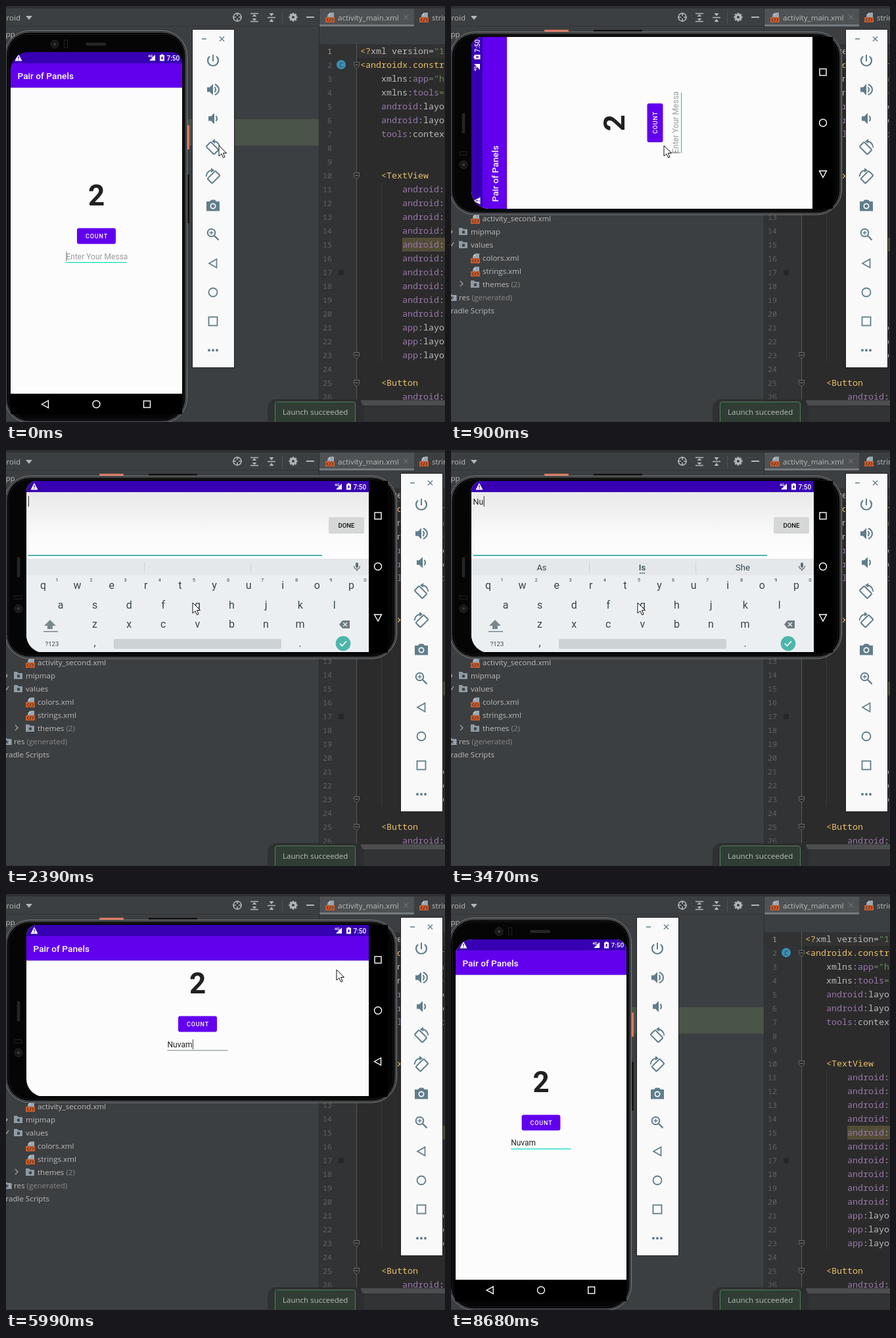
These frames come from a looping animation (668x632 px, 9080 ms). An HTML page:

```html
<!DOCTYPE html>
<html lang="en">
<head>
<meta charset="utf-8">
<title>Device rotation</title>
<style>
html, body { margin: 0; width: 100%; height: 100%; overflow: hidden; background: #3c3f41; }
svg { display: block; width: 668px; height: 632px; }
text { white-space: pre; }
.ui { font: 11.55px "Open Sans", "Noto Sans", sans-serif; fill: #bbb; }
.code { font: 13.33px "Noto Sans Mono", "DejaVu Sans Mono", monospace; }
.num { font: 11.67px "Noto Sans Mono", monospace; fill: #606366; text-anchor: end; }
.app { font-family: Roboto, sans-serif; }
.mid { text-anchor: middle; }
</style>
</head>
<body>
<svg id="stage" viewBox="0 0 668 632" xmlns="http://www.w3.org/2000/svg"></svg>
<script>
const LOOP = 9080, NAME = 'Nuvam', TITLE = 'Pair of Panels', TEAL = '#03dac5';

const rect = (x, y, w, h, fill, more = '') =>
  `<rect x="${x}" y="${y}" width="${w}" height="${h}" fill="${fill}" ${more}/>`;
const path = (d, more = '') => `<path d="${d}" ${more}/>`;
const line = (d, color, w = 1, more = '') =>
  path(d, `fill="none" stroke="${color}" stroke-width="${w}" ${more}`);
const circle = (x, y, r, more = '') => `<circle cx="${x}" cy="${y}" r="${r}" ${more}/>`;
const text = (x, y, s, more = '') => `<text x="${x}" y="${y}" ${more}>${s.replace(/</g, '&lt;')}</text>`;
const at = (x, y, body, more = '') => `<g transform="translate(${x} ${y})" ${more}>${body}</g>`;

// ---- editor window -------------------------------------------------
const fileIcon = (x, y) => at(x, y,
  path('M8-7H13V0H3V-2z', 'fill="#9aa7b0"') + path('M3-3L7-7V-3z', 'fill="#c3cbd0"') +
  rect(0, 0, 14, 8, '#c75b2c') +
  line('M4.5 1.5L2 4L4.5 6.5M9.5 1.5L12 4L9.5 6.5M8 1.5L6 6.5', '#4a2c20'));

const folder = (x, y) => at(x, y,
  path('M0-6H5L7-4H13V5H0z', 'fill="#8e9ba4"') + rect(5, -1.5, 4, 4, '#3c3f41'));

function tree() {
  const row = (x, y, s, note = '') =>
    text(x, y + 4, s, 'class="ui"').replace('</text>', `<tspan fill="#888">${note}</tspan></text>`);
  let out = rect(0, 172, 476, 40, '#4a5448') + text(-7, 47, 'app', 'class="ui" font-weight="700"');
  for (const [y, s] of [[323, 'activity_second.xml'], [383, 'colors.xml'], [403, 'strings.xml']])
    out += fileIcon(30, y) + row(48, y, s);
  out += folder(12, 343) + row(30, 343, 'mipmap') + folder(12, 363) + row(30, 363, 'values') +
    folder(30, 423) + row(48, 423, 'themes ', '(2)') + row(12, 443, 'res ', '(generated)') +
    folder(-5, 443) + line('M2 441H9M2 444H9M2 447H9', '#9aa7b0', 1.5) +
    text(66, 467, 'Gradle Scripts', 'class="ui" text-anchor="end"');
  return out + line('M14 418L18 422L14 426M-2 339L2 343L-2 347M-2 361L1 364L4 359', '#a0a2a4', 1.3);
}

function header() {
  const c = '#b4b6b8';
  let gear = '';
  for (let a = 0; a < 360; a += 45) gear += rect(-1.5, -6.5, 3, 4, c, `transform="rotate(${a})"`);
  return rect(0, 0, 668, 3, '#2e3032') + line('M0 3.5H668M0 30.5H477', '#323436') +
    text(22, 22, 'Android', 'class="ui" text-anchor="end"') + path('M30 15H40L35 21z', `fill="${c}"`) +
    line('M352 10V15M352 19V24M345 17H350M354 17H359', c, 1.6) +
    circle(352, 17, 6, `fill="none" stroke="${c}" stroke-width="1.6"`) +
    line('M372 11.5H384M372 23.5H384M398 17.5H410', c, 1.6) +
    path('M378 12.5L381.5 16H374.5zM378 22.5L381.5 19H374.5zM404 15.5L400.5 11H407.5zM404 19.5L400.5 24H407.5z', `fill="${c}"`) +
    line('M420.5 8V27', '#515355') +
    at(437, 17, gear + circle(0, 0, 3.4, `fill="none" stroke="${c}" stroke-width="2.6"`)) +
    line('M457 17H469', c, 2);
}

function editor() {
  const tag = '#e8bf6a', ns = '#9876aa', key = '#bababa', str = '#6a8759';
  const row = n => 68 + 21 * (n - 1);
  const code = (n, x, ...parts) => {
    let out = '';
    for (let i = 0; i < parts.length; i += 2) {
      out += text(x, row(n) + 5, parts[i + 1], `class="code" fill="${parts[i]}"`);
      x += parts[i + 1].length * 8;
    }
    return out;
  };
  let out = rect(477, 31, 191, 577, '#2b2b2b') + rect(477, 31, 57, 577, '#313335') +
    rect(477, 31, 191, 27, '#3c3f41') + rect(477, 58, 191, 21, '#323232') +
    rect(477, 608, 191, 24, '#313335') + line('M476.5 3V608', '#2b2d2e') +
    rect(477, 4, 144, 27, '#4e5254') + rect(477, 28, 144, 3, '#747a80') +
    fileIcon(486, 17) + text(505, 22, 'activity_main.xml', 'class="ui"') +
    line('M605 13.5L612 20.5M612 13.5L605 20.5', '#7c8082') +
    fileIcon(629, 17) + text(648, 22, 'strings.xml', 'class="ui"') +
    rect(603, 352, 65, 21, '#524d36') +
    line('M533.5 58V600', '#55585a') + line('M571.5 268V541', '#3a3a3a');
  for (let n = 1; n <= 26; n++)
    out += text(496, row(n) + 4.5, '' + n, `class="num" ${n == 1 ? 'style="fill:#a4a3a3"' : ''}`);
  for (const y of [90, 258, 531, 573])
    out += path(`M529.5 ${y - 4.5}H537.5V${y + 1}L533.5 ${y + 5}L529.5 ${y + 1}z`, 'fill="#2b2b2b" stroke="#686b6d"') +
      line(`M531.5 ${y - 0.5}H535.5`, '#86898b');
  out += circle(510, 89, 7, 'fill="#3b8fb3"') +
    text(510, 92.5, 'C', 'class="ui mid" style="font-size:9px;fill:#1f3a47"') + rect(506, 401, 8, 8, '#252627');
  out += code(1, 539, tag, '<?', key, 'xml version=', str, '"1.0"') +
    code(2, 539, tag, '<androidx.constraint') +
    code(3, 571, key, 'xmlns:', ns, 'app', str, '="http') +
    code(4, 571, key, 'xmlns:', ns, 'tools', str, '="ht') +
    code(7, 571, ns, 'tools', key, ':context') +
    code(10, 571, tag, '<TextView') + code(25, 571, tag, '<Button');
  for (const n of [5, 6]) out += code(n, 571, ns, 'android', key, ':layout');
  for (let n = 11; n <= 20; n++) out += code(n, 603, ns, 'android', key, ':id');
  for (const n of [21, 22, 23]) out += code(n, 603, ns, 'app', key, ':layout');
  return out + code(26, 603, ns, 'android', key, ':id') + rect(540, 599, 128, 8, '#4c4d4e');
}

const notice = rect(398, 597, 146, 50, '#2b2d2e', 'rx="14" opacity=".75"') +
  rect(409.5, 601.5, 122, 40, '#303d34', 'rx="3" stroke="#55805a"') +
  text(421, 621, 'Launch succeeded', 'class="ui"') + line('M0 631.5H409', '#323436');

// ---- phone ---------------------------------------------------------
const screenPath = 'M7 620V97A27 27 0 0 1 34 70H252A16 16 0 0 1 268 86V620z';

function shell() {
  let grill = '';
  for (let x = 123; x < 151; x += 3) grill += `M${x} 56L${x + 2} 60`;
  return rect(275, 256, 4, 74, '#161616') + rect(276, 181, 3, 37, '#d9795f', 'rx="1"') +
    rect(-2, 37.5, 277.5, 596, '#2c2e2f', 'rx="38" stroke="#808284"') +
    rect(0.5, 40, 272.5, 591, '#000', 'rx="35" stroke="#5a5c5e"') +
    rect(3, 43, 267.5, 585, '#050505', 'rx="32" stroke="#1d1e1f"') +
    circle(74, 58, 6, 'fill="#151515" stroke="#2c2c2c"') + circle(74, 58, 2.5, 'fill="#333"') +
    rect(88.5, 52, 5, 11, 'none', 'stroke="#222"') +
    rect(121, 55.5, 31, 5, '#1b1b1b', 'rx="2"') + line(grill, '#3a3a3a');
}

function app(id, w, h, base) {
  const cx = w / 2, left = cx - 46, wide = w > h;
  const spots = [53, 130.5, 207.5];
  const [b, o, q] = wide ? spots.map(v => [535, 260.5 - v]) : spots.map(v => [v, 535]);
  const status = rect(0, 0, w, 17, '#3700b3') +
    path('M12 3L17.5 13.5H6.5z', 'fill="#fff"') + rect(11.4, 6.5, 1.3, 3.5, '#3700b3') + rect(11.4, 11, 1.3, 1.2, '#3700b3') +
    path(`M${w - 41} 13V4L${w - 50} 13z`, 'fill="#fff"') +
    text(w - 52, 8, '4G', 'font-size="6" font-weight="700" fill="#fff"') +
    path(`M${w - 34} 4.5h2v-1h3v1h2v9h-7z`, 'fill="#fff"') + rect(w - 31.5, 7, 2, 4, '#3700b3') +
    text(w - 23.5, 12.5, '7:50', 'font-size="10" font-weight="500" fill="#fff"');
  return `<g id="${id}" class="app">` + rect(-1, -1, wide ? 552 : w + 1, wide ? h + 2 : 552, '#000') +
    rect(0, 0, w, h, '#fcfcfc') + rect(0, 17, w, 37, '#6200ee') + rect(0, 54, w, 1, '#000', 'opacity=".12"') +
    text(10.5, 41, TITLE, 'font-size="13.7" font-weight="500" fill="#fff"') +
    text(cx, base, '2', 'class="mid" font-size="44" font-weight="700" fill="#212121"') +
    rect(cx - 29.5, base + 34.5, 59, 24, '#6200ee', 'rx="3"') +
    text(cx + .5, base + 50, 'COUNT', 'class="mid" font-size="9" font-weight="500" letter-spacing=".9" fill="#fff"') +
    text(left, base + 81.5, 'Enter Your Messa', `id="${id}Text" font-size="12" fill="#9b9b9b"`) +
    rect(left, base + 86, 92, 1.2, TEAL, `id="${id}Line"`) +
    rect(left, base + 70, 1, 15, '#777', `id="${id}Caret"`) +
    status + (wide ? keyboard() : '') +
    `<g fill="none" stroke="#fff" stroke-width="1.4">` +
    at(...b, path('M-5.5 0L4.5-5.5V5.5z', `id="${id}Back"`)) + circle(...o, 5.5) +
    rect(q[0] - 5, q[1] - 5, 10, 10, 'none') + '</g></g>';
}

// Laid out in page coordinates of the turned phone, then moved into its screen.
function keyboard() {
  const key = (x, y, s, size = 16, more = '') =>
    text(x, y, s, `class="mid" font-size="${size}" fill="#37474f" ${more}`);
  let keys = '';
  [...'qwertyuiop'].forEach((k, i) => {
    const x = 56.5 + 52.1 * i;
    keys += key(x, 211, k) + key(x + 21, 200, '' + (i + 1) % 10, 7.5);
  });
  [...'asdfghjkl'].forEach((k, i) => keys += key(83 + 52.1 * i, 241, k));
  [...'zxcvbnm'].forEach((k, i) => keys += key(135 + 52.1 * i, 270, k));
  keys += key(70, 298, '?123', 9.5) + key(135, 298, ',') + key(447.5, 299, '.');
  keys += rect(164, 287, 255, 15, '#cdd2d5', 'rx="2"') +
    path('M67 258L76 267H71V272H63V267H58z', 'fill="#78868d"') + rect(57, 275, 22, 1.5, '#78868d') +
    path('M507 265L512 259H523V271H512z', 'fill="#6b7a82"') + line('M513 262L519 268M519 262L513 268', '#eceff1', 1.4) +
    circle(513, 294, 11.3, 'fill="#4db6ac"') + line('M508 294L511.5 297.5L518 290.5', '#fff', 1.6) +
    rect(532, 171, 4, 8, '#5f6e76', 'rx="2"') + line('M529.5 176Q530 181 534 181Q538 181 538.5 176M534 181V184', '#5f6e76', 1.3);
  const hints = [138, 291, 444].map((x, i) =>
    key(x, 183, '', 13, `id="hint${i}" ${i == 1 ? 'font-weight="500"' : ''}`)).join('');
  return at(-31, -47, `<g id="ime">` + rect(31, 64, 521, 101, 'url(#shade)') +
    rect(34, 159.5, 447, 1.4, '#009688') +
    rect(491, 102, 54, 25, '#d6d7d7', 'id="done" rx="2"') +
    text(518, 118, 'DONE', 'class="mid" font-size="9.5" font-weight="500" fill="#111"') +
    text(33.5, 83, '', 'id="typed" font-size="12.5" fill="#222"') + rect(34, 70, 1, 16, '#333', 'id="typedCaret"') +
    `<g id="keys">` + rect(31, 165, 521, 142, '#eceff1') + rect(31, 165, 521, 25, '#e4e8ea') +
    line('M210.5 170V187M372.5 170V187', '#cdd2d5') +
    hints + `<g id="dots">` + [288, 291, 294].map(x => circle(x, 187, .9, 'fill="#37474f"')).join('') +
    '</g>' + keys + '</g></g>');
}

// ---- emulator side bar ---------------------------------------------
function toolbar() {
  const c = '#607d8b', st = (d, w = 2) => line(d, c, w);
  const speaker = path('M-9-3.5H-5L0-8.5V8.5L-5 3.5H-9z', `fill="${c}"`);
  const turn = rect(-5, -8.5, 10, 17, 'none', `stroke="${c}" stroke-width="2" rx="1.5" transform="translate(-1 1) rotate(-45)"`) +
    st('M1-9.5Q9-9 10.5 0', 1.8) + path('M3-13V-6L-2-9.5z', `fill="${c}"`);
  const items = [
    st('M0-9V1') + st('M-5-6.5A8 8 0 1 0 5-6.5', 2.2),
    speaker + st('M2.5-4Q5.5 0 2.5 4M3-8Q9-5 9 0Q9 5 3 8'),
    at(2, 0, speaker + st('M2.5-4Q5.5 0 2.5 4')),
    turn,
    `<g transform="scale(-1 1)">${turn}</g>`,
    path('M-10-6H-5L-3-8.5H3L5-6H10V8.5H-10z', `fill="${c}"`) + circle(0, 1, 4.5, 'fill="#f9f9f9"') + circle(0, 1, 2.8, `fill="${c}"`),
    circle(-2.5, -2.5, 5.8, `fill="none" stroke="${c}" stroke-width="2"`) + st('M2 2L8.5 8.5', 2.4) + st('M-5.5-2.5H.5M-2.5-5.5V.5', 1.4),
    st('M-6 0L5.5-6.5V6.5z', 1.7),
    circle(0, 0, 6.5, `fill="none" stroke="${c}" stroke-width="1.8"`),
    rect(-6.5, -6.5, 13, 13, 'none', `stroke="${c}" stroke-width="1.8"`),
    [-6, 0, 6].map(x => circle(x, 0, 2, `fill="${c}"`)).join('')
  ];
  return rect(.5, 35.5, 64, 514, '#f9f9f9', 'stroke="#1d1e1f"') +
    line('M15 50H22M42 46.5L49 53.5M49 46.5L42 53.5', c, 1.4) +
    items.map((s, i) => at(32, 83 + 44 * i, s)).join('');
}

const stage = document.getElementById('stage');
stage.innerHTML = `<defs>
  <clipPath id="screenClip"><path d="${screenPath}"/></clipPath>
  <clipPath id="cutClip"><path d="M-5 30H285V318H36Q8 317 0 298H-5z"/></clipPath>
  <linearGradient id="shade" x2="0" y2="1"><stop stop-color="#e9e9e9"/><stop offset=".65" stop-color="#fafafa"/><stop offset="1" stop-color="#fdfdfd"/></linearGradient>
</defs>` + rect(0, 0, 668, 632, '#3c3f41') + tree() + header() + editor() + notice +
  `<g id="cut"><g id="phone">${shell()}<g id="screen" clip-path="url(#screenClip)">` +
  rect(0, 60, 280, 570, '#000') +
  `<g id="tallSpin">${app('tall', 261, 519, 233)}</g><g id="wideSpin">${app('wide', 521, 260, 104)}</g>` +
  `</g></g></g><g id="bar">${toolbar()}</g>` +
  path('M0 0V16L4 12.5L6.5 18.5L9 17.5L6.5 11.5H11.5z', 'id="arrow" fill="#fff" stroke="#111"') +
  line('M-3-7H-1L0-6L1-7H3M0-6V6M-3 7H-1L0 6L1 7H3', '#d0d0d0', 1.2, 'id="beam" transform="translate(633 255)"');

// ---- motion --------------------------------------------------------
const $ = {};
stage.querySelectorAll('[id]').forEach(e => $[e.id] = e);
const set = (id, name, value) => $[id].setAttribute(name, value);
const show = (id, on) => set(id, 'opacity', +on);
const between = (t, a, b) => t >= a && t < b;

set('wide', 'transform', 'translate(268 70) rotate(90)');

const turnLeft = (t, start, beat) => {
  if (t < start) return 1;
  const beats = Math.floor((t - start) / beat) + 1;
  return (1 - Math.min(1, beats * beat / 380)) ** 2;
};

const pointer = [
  [0, 324, 212], [1300, 325, 216], [1410, 326, 220], [1560, 318, 223], [1700, 306, 226],
  [1830, 295, 229], [1960, 288, 231], [2100, 284, 232],
  [4750, 322, 188], [4890, 372, 118], [5030, 430, 54], [5170, 489, 84], [5450, 503, 115],
  [6270, 530, 148], [6410, 572, 196], [6550, 612, 236], [6690, 633, 253]
];
const typing = [[0, 0], [3060, 1], [3470, 2], [3750, 3], [3880, 4], [4020, 5]];
const latest = (list, t) => list.filter(k => k[0] <= t).pop();

function field(id, named) {
  $[id + 'Text'].textContent = named ? NAME : 'Enter Your Messa';
  set(id + 'Text', 'fill', named ? '#222' : '#9b9b9b');
}

function draw(t) {
  const wide = between(t, 640, 7220), cut = between(t, 250, 640), back = t >= 7220;
  set('phone', 'transform', wide ? 'translate(-39 315) rotate(-90)' : back ? 'translate(-1 -1)' : '');
  set('cut', 'clip-path', cut ? 'url(#cutClip)' : 'none');
  set('bar', 'transform', `translate(${cut ? 601 : wide ? 600 : back ? 282 : 283} 0)`);

  // Both layouts turn about the screen centre while the old one fades on top.
  const left = back ? turnLeft(t, 7650, 147) : turnLeft(t, 1170, 120);
  const [old, fresh] = back ? ['wideSpin', 'tallSpin'] : ['tallSpin', 'wideSpin'];
  const turn = back ? -90 : 90;
  set(old, 'transform', `rotate(${turn * (1 - left)} 137.5 345)`);
  set(fresh, 'transform', `rotate(${-turn * left} 137.5 345)`);
  show(old, left < .02 ? 0 : left);
  show(fresh, left < 1);
  if ($.screen.lastChild !== $[old]) $.screen.appendChild($[old]);
  set('tall', 'transform', back ? 'translate(8 70) scale(.9961)' : 'translate(7 70)');

  const named = t > 3000;
  field('tall', back);
  field('wide', named);
  show('tallCaret', t < 1170);
  set('wideLine', 'fill', named && !back ? '#8a9a99' : TEAL);
  set('wideCaret', 'x', named ? 253 : 214.5);
  set('wideCaret', 'fill', named ? '#444' : TEAL);
  show('wideCaret', t < 2240 || between(t, 5990, 6410));

  const ime = between(t, 2240, 5720), sliding = t < 2390 || t >= 5590;
  show('ime', ime ? (sliding ? .6 : 1) : 0);
  set('keys', 'transform', `translate(0 ${sliding ? 50 : 0})`);
  set('wideBack', 'transform', ime ? 'rotate(-90)' : '');
  set('done', 'fill', t >= 5450 ? '#b9baba' : '#d6d7d7');
  const typed = NAME.slice(0, latest(typing, t)[1]);
  $.typed.textContent = typed;
  set('typedCaret', 'x', 34 + $.typed.getComputedTextLength());
  show('typedCaret', !between(t, 2660, 3060) && !between(t, 4160, 4750) && t < 5170);
  const words = t < 3180 ? ['', '', ''] : t < 3610 ? ['As', 'Is', 'She'] : ['Nut', typed, 'Number'];
  words.forEach((w, i) => $['hint' + i].textContent = w);
  show('dots', t >= 3180);

  const [, x, y] = latest(pointer, t);
  set('arrow', 'transform', `translate(${x} ${y})`);
  show('arrow', !back);
  show('beam', between(t, 7220, 7944));
}

(function tick() {
  draw(performance.now() % LOOP);
  requestAnimationFrame(tick);
})();
</script>
</body>
</html>
```
